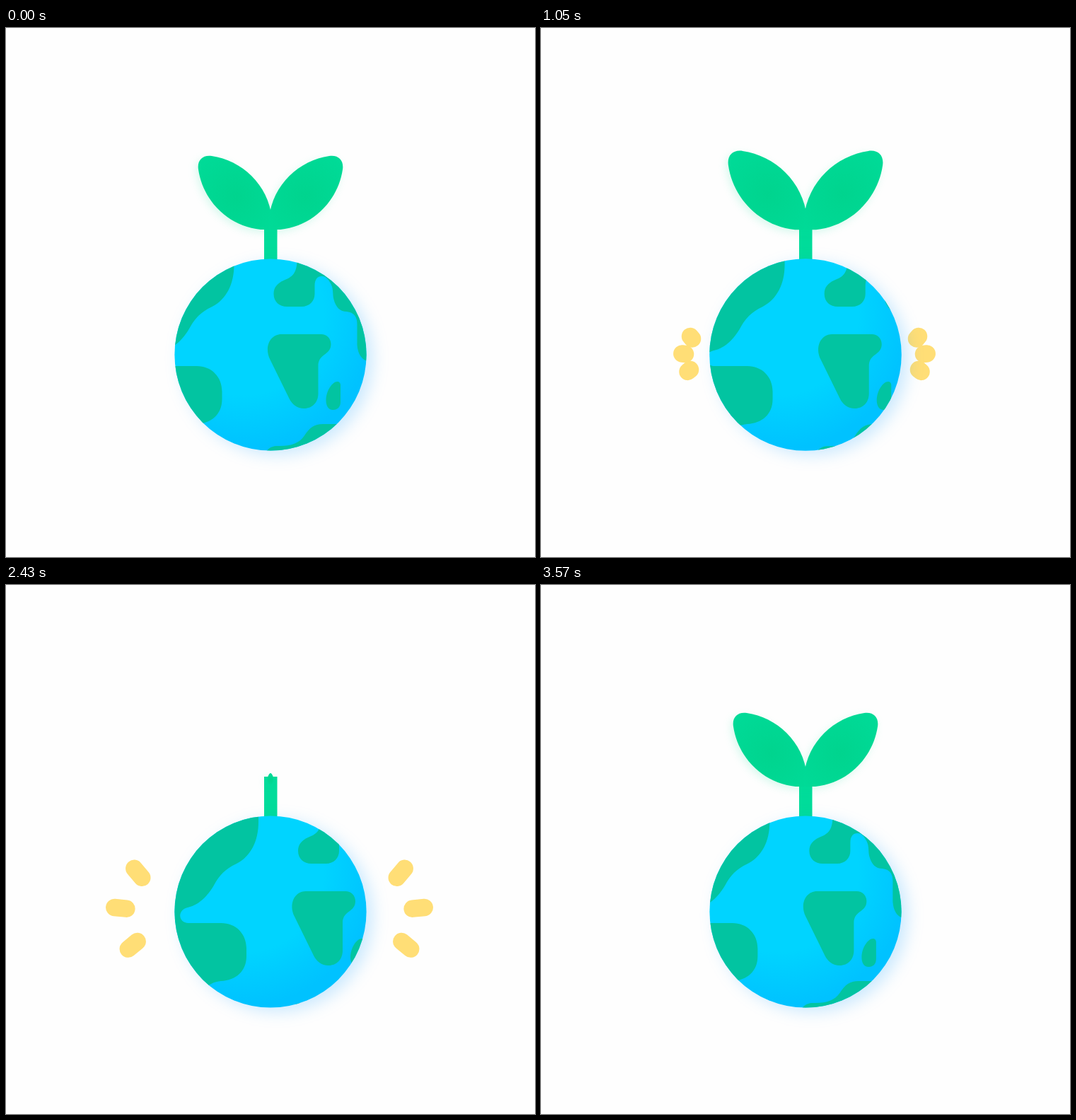
An HTML page for the animation above (3.6 s loop, 748x748 px).

```html
<!DOCTYPE html>
<html lang="en">
<head>
<meta charset="utf-8">
<title>Growing planet</title>
<style>
  html, body { margin: 0; width: 100%; height: 100%; overflow: hidden; background: #fefefe; }
  svg { display: block; width: 100vw; height: 100vh; }
  #globe { filter: drop-shadow(9px 6px 11px rgba(0, 150, 255, .2)); }
  #leaves { filter: drop-shadow(-3px 4px 6px rgba(0, 220, 150, .15)); }
</style>
</head>
<body>
<svg viewBox="0 0 748 748">
  <defs>
    <radialGradient id="sea" gradientUnits="userSpaceOnUse" cx="335" cy="405" r="190">
      <stop offset=".6" stop-color="#00d4ff"/>
      <stop offset="1" stop-color="#00c2ff"/>
    </radialGradient>
    <radialGradient id="leafFill" gradientUnits="userSpaceOnUse" cx="325" cy="238" r="75">
      <stop offset="0" stop-color="#00d48e"/>
      <stop offset="1" stop-color="#00db98"/>
    </radialGradient>
    <clipPath id="disc"><circle cx="374" cy="462" r="135.6"/></clipPath>
    <path id="leaf" fill="url(#leafFill)" d="M376 285H360C312 280 278 242 272 200C270 187 278 179 291 181C333 187 371 221 376 269Z"/>
  </defs>

  <g id="rays" fill="none" stroke="#ffde76" stroke-width="24.5" stroke-linecap="round"></g>

  <rect id="stem" x="365" width="18.5" height="70" fill="#00dc9a"/>
  <g id="leaves">
    <use id="left" href="#leaf"/>
    <g transform="matrix(-1 0 0 1 748 0)"><use id="right" href="#leaf"/></g>
  </g>

  <g id="globe">
    <circle cx="374" cy="462" r="135.6" fill="url(#sea)"/>
    <g clip-path="url(#disc)">
      <g id="land" fill="#02c4a1">
        <path d="M357 300V335C357 362 346 384 326 394C309 402 302 411 296 421C288 436 275 452 257 456C242 459 243 478 258 478H304C325 478 340 493 340 514V525C340 546 325 559 304 560C294 561 288 564 283 570L250 610H150V300Z"/>
        <path d="M446 300V328C446 350 436 353 427 357C418 361 413 367 413 376C413 387 421 394 432 394H452C464 394 471 386 471 376V365C471 355 475 351 481 351C488 351 491 357 494 362C498 370 496 377 498 384C501 395 507 401 516 401C527 402 531 409 531 418V448C532 461 537 468 545 471H600V300Z"/>
        <path d="M424 433H480C488 433 494 439 494 447C494 463 476 460 476 478V517C476 529 468 538 456 538C446 538 439 532 435 524L408 469C399 451 408 433 424 433Z"/>
        <path d="M503 500C506 500 507.500 502 507.500 505V529C507.500 536 503 540 497 540C490 540 487 534 487 526C487 513 496 500 503 500Z"/>
        <path d="M400 602C407 591 413 591 422 591C438 591 449 587 456 577C464 565 470 560 483 560H600V620H400Z"/>
      </g>
    </g>
  </g>
</svg>
<script>
const CYCLE = 1800, STEP = 30;
const $ = id => document.getElementById(id);
const clamp = x => Math.min(1, Math.max(0, x));
const smooth = x => (x = clamp(x), x * x * (3 - 2 * x));
const mix = (a, b, k) => a + (b - a) * k;

// Linear rise to 1 ending at `peak`, then a damped overshoot.
function pop(t, peak, rise) {
  const d = (t - peak) / 1000;
  if (d < 0) return clamp(1 + d * 1000 / rise);
  return 1 + .5 * Math.exp(-7.4 * d) * Math.sin(9.24 * d);
}

// Each ray runs from its inner end to its outer end.
const rays = [[214, 439.5, 181.3, 400.8], [204, 461, 153.3, 456], [211, 483, 172.8, 514.6]]
  .flatMap(r => [r, r.map((v, i) => i % 2 ? v : 745 - v)])
  .map(ends => {
    const path = document.createElementNS("http://www.w3.org/2000/svg", "path");
    $("rays").append(path);
    return { path, ends };
  });

function drawRays(t) {
  const b = t < 900 ? t : t - 750;
  const head = smooth((b - 240) / 320), tail = smooth((b - 410) / 360);
  for (const { path, ends: [x1, y1, x2, y2] } of rays) {
    const at = k => `${mix(x1, x2, k)} ${mix(y1, y2, k)}`;
    path.setAttribute("d", head > tail ? `M${at(tail)}L${at(head)}` : "");
  }
}

function drawPlant(t) {
  const grown = smooth((t - 360) / 210);
  $("stem").setAttribute("y", mix(341, 271, grown));
  $("stem").style.display = grown > 0 ? "" : "none";

  const size = pop(t, 812, 207);
  const angle = 45 * clamp((t - 630) / 270) ** 1.35;
  const pose = `translate(374 283) rotate(${45 - angle}) scale(${size}) translate(-374 -283)`;
  $("left").setAttribute("transform", pose);
  $("right").setAttribute("transform", pose);
  $("leaves").style.display = size > 0 ? "" : "none";
}

function drawGlobe(t) {
  const size = pop(t, 290, 260);
  $("globe").setAttribute("transform", `translate(374 469) scale(${size}) translate(-374 -469)`);
  $("globe").style.display = size > 0 ? "" : "none";
  $("land").setAttribute("transform", `translate(${(630 - t) * .0295} 0)`);
}

function frame() {
  const now = Math.floor(performance.now() / STEP) * STEP;
  const t = (now - STEP + CYCLE) % CYCLE + STEP;
  drawRays(t);
  drawPlant(t);
  drawGlobe(t);
  requestAnimationFrame(frame);
}
frame();
</script>
</body>
</html>
```
